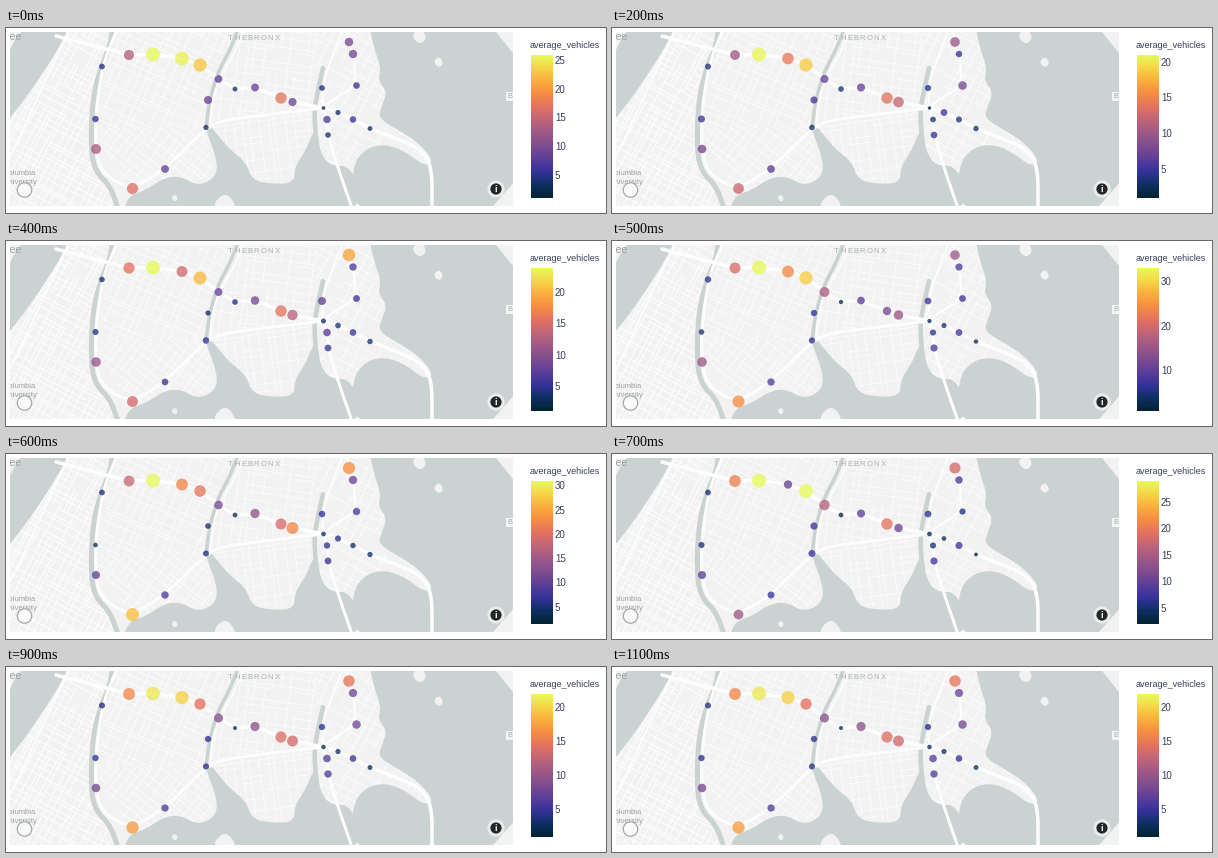
Animation, 600 px wide and 185 px high, one loop 1300 ms. Source, as a matplotlib script:

```python
import numpy as np
import matplotlib.pyplot as plt
from matplotlib.animation import FuncAnimation
from matplotlib.collections import LineCollection
from matplotlib.colors import LinearSegmentedColormap, Normalize
from matplotlib.patches import Circle, Polygon, Rectangle

W, H, DPI = 600, 185, 100
PX = 72 / DPI
LAND, WATER, STREET = "#f1f2f1", "#cad2d2", "#fdfdfd"
INK = "#364059"
BAR_TOP, BAR_BOTTOM = 27, 170
MAX_DOT = 14
FRAMES, STEP = 13, 100

thermal = LinearSegmentedColormap.from_list("thermal", [
    "#032333", "#0d3064", "#35329b", "#5d3e99", "#7e4d8f", "#9e5987",
    "#c16479", "#e17161", "#f68b45", "#fbad3c", "#f6d346", "#e7fa5a"])

# Colour range by hour; after LAST_HOUR the picture holds
HOURS = [0, 2, 4, 5, 7, 9]
LOW = [1, 1, 1, 1, 2, 1]
HIGH = [26, 21, 24, 33, 29, 22]
LAST_HOUR = HOURS[-1]

# Counters along each road: x, y, usual load
cross = [(123, 27, 15), (147, 26.5, 27), (176, 30.5, 17), (194, 37, 19),
         (212.5, 51, 11), (229, 61, 3), (249, 59.5, 9), (275, 70, 16), (286.5, 74, 12)]
harlem = [(96, 38.5, 4), (89.5, 91, 5), (90, 121, 9)]
bruckner = [(126.5, 160.5, 15), (159, 141, 7), (200, 99.5, 5), (202, 72, 5)]
shore = [(343, 14, 14), (347, 26, 7), (350.5, 57.5, 6), (316, 60, 5)]
throgs = [(317.5, 80, 2), (332, 84.5, 4), (347, 91.5, 5), (364, 100.5, 3)]
ferry = [(321, 91.5, 5), (322, 107, 6)]

xs, ys, load = np.array(cross + harlem + bruckner + shore + throgs + ferry).T
swing = np.exp(np.random.default_rng(4).normal(0, .22, (LAST_HOUR + 1, len(load))))

fig = plt.figure(figsize=(W / DPI, H / DPI), dpi=DPI, facecolor="white")
ax = fig.add_axes([0, 0, 1, 1])
ax.axis("off")
frame = Rectangle((4, 4), 503, 174, fc=LAND, ec="none", zorder=0)
ax.add_patch(frame)


def on_map(artist):
    artist.set_clip_path(frame)
    return artist


def smooth(pts, closed=False, rounds=2):
    """Corner cutting."""
    p = np.array(pts, float)
    for _ in range(rounds):
        a, b = (p, np.roll(p, -1, 0)) if closed else (p[:-1], p[1:])
        q = np.stack([.75 * a + .25 * b, .25 * a + .75 * b], 1).reshape(-1, 2)
        p = q if closed else np.vstack([p[:1], q, p[-1:]])
    return p


def area(pts, color=WATER, z=2):
    on_map(ax.add_patch(Polygon(smooth(pts, True), fc=color, ec="none", zorder=z)))


def road(pts, width, color=STREET, z=4):
    on_map(ax.plot(*smooth(pts).T, color=color, lw=width * PX, zorder=z,
                   solid_capstyle="round")[0])


def grid(region, angle, gap, seed, width=.8):
    """Rotated street grid with some gaps, cut to a region."""
    rng = np.random.default_rng(seed)
    mid = np.mean(region, 0)
    t = np.radians(angle)
    u, v = np.array([np.cos(t), np.sin(t)]), np.array([-np.sin(t), np.cos(t)])
    lines = []
    for along, across in ((u, v), (v, u)):
        for k in np.arange(-150, 150, gap):
            shift = k + rng.uniform(-.3, .3) * gap
            for s in range(-150, 150, 25):
                if rng.random() < .8:
                    a = mid + across * shift + along * s
                    lines.append([a, a + along * 25])
    streets = LineCollection(lines, colors=STREET, linewidths=width * PX, zorder=1)
    ax.add_collection(streets)
    streets.set_clip_path(Polygon(region, transform=ax.transData))


# Streets
grid([(4, 60), (60, 4), (104, 4), (84, 100), (108, 178), (4, 178)], -62, 6, 1, 1.1)
grid([(104, 4), (222, 4), (200, 100), (92, 100)], -66, 8, 2)
grid([(86, 100), (200, 100), (208, 150), (124, 166)], -52, 7.5, 3)
grid([(222, 4), (310, 4), (310, 80), (200, 96)], 8, 8.5, 4)
grid([(204, 97), (310, 82), (290, 156), (240, 150)], -8, 8.5, 5)
grid([(310, 4), (365, 4), (420, 130), (312, 140)], 28, 10, 6)

# Water
area([(20, -8), (66, -8), (52, 22), (20, 70), (-4, 100), (-4, 36)])
area([(362, -8), (368, 20), (375, 40), (372, 52), (381, 64), (376, 78), (372, 90),
      (394, 103), (414, 116), (428, 134), (418, 138), (400, 124), (380, 116),
      (360, 120), (346, 138), (346, 190), (520, 190), (520, -8)])
area([(116, 190), (122, 168), (140, 162), (158, 150), (174, 148), (192, 158),
      (209, 150), (212, 134), (198, 97), (204, 97), (222, 120), (240, 134),
      (246, 152), (266, 156), (288, 155), (289, 138), (300, 122), (307, 104),
      (312, 104), (314, 124), (324, 138), (346, 138), (364, 190)])
road([(106, 4), (104, 18), (93, 44), (86, 76), (85, 124), (90, 144),
      (104, 158), (112, 180)], 5, WATER, 2)
road([(231, 4), (223, 24), (211, 46), (203, 76), (200, 100)], 3.6, WATER, 2)
road([(317, 40), (312, 62), (308, 84), (310, 110)], 4.5, WATER, 2)
for x, y, r in ((169, 170, 4), (220, 178, 15), (414, 8, 9), (433, 34, 6)):
    area([(x - r, y), (x, y - r), (x + .8 * r, y + .2 * r), (x, y + r)], LAND, 3)

# Highways, through the counters where there are any
hub = throgs[0][:2]
xy = lambda row: [p[:2] for p in row]
road([(50, 8), (96, 20)] + xy(cross) + [hub], 3.6)
road([(110, 4)] + xy(harlem) + [(94, 140), (106, 152)] + xy(bruckner[:2])
     + [(198, 102), (214, 93), (250, 88), hub], 3)
road(xy(throgs) + [(394, 112), (416, 122), (426, 140), (426, 180)], 3.6)
road([hub] + xy(ferry) + [(332, 140), (346, 180)], 3)
road([(341, 4)] + xy(shore[:3]) + [(326, 72), hub], 2.4)
road([hub, shore[3][:2], (324, 34), (336, 4)], 2)
road([(237, 4), (229, 24), (214, 50), (206, 72), (204, 100)], 1.8)
road([(62, 6), (34, 64), (14, 108), (4, 128)], 1.8)


def label(x, y, s, size, color, **kw):
    return ax.text(x, y, s, fontsize=size * PX, color=color, va="center",
                   family="Liberation Sans", **kw)


# Place names and controls
for start, word in ((224.5, "THE"), (243.5, "BRONX")):
    for i, ch in enumerate(word):
        label(start + 6.9 * i, 10.5, ch, 7.8, "#adb3b5", ha="center", zorder=5)
for x, y, s, size in ((15, 9, "Fort Lee", 10.5), (30, 145.5, "Columbia", 7.6),
                      (31, 154.5, "University", 7.6)):
    on_map(label(x, y, s, size, "#9da2a4", ha="right", zorder=5, clip_on=True))
on_map(ax.add_patch(Rectangle((500, 64), 8, 8.5, fc="#f4f5f5", ec="none", zorder=5)))
on_map(label(501, 68.5, "B", 7.5, "#a5abad", ha="left", zorder=6, clip_on=True))
ax.add_patch(Circle((18.5, 162), 7.2, fc="#fafafa", ec="#a5aaab", lw=.9, zorder=7))
ax.add_patch(Circle((490, 161), 8.6, fc="white", ec="none", alpha=.6, zorder=7))
ax.add_patch(Circle((490, 161), 5.6, fc="#252727", ec="none", zorder=7))
label(490, 161.2, "i", 9, "white", ha="center", weight="bold", zorder=8)

# Colour bar
ax.imshow(np.linspace(1, 0, 256)[:, None], cmap=thermal, aspect="auto",
          extent=(525, 547, BAR_BOTTOM, BAR_TOP), zorder=2)
ax.set_xlim(0, W)
ax.set_ylim(H, 0)
label(524, 17.5, "average_vehicles", 9, INK, ha="left")
ticks = [label(549, 0, "", 9.8, INK, ha="left") for _ in range(6)]
dots = on_map(ax.scatter(xs, ys, s=1, c=load, cmap=thermal, alpha=.78,
                         linewidths=0, zorder=6))


def update(i):
    hour = min(i, LAST_HOUR)
    low, high = (np.interp(hour, HOURS, r) for r in (LOW, HIGH))
    counts = np.clip(load / 25 * high * swing[hour], low, high)
    dots.set_sizes((MAX_DOT * PX) ** 2 * counts / high)
    dots.set_array(counts)
    dots.set_norm(Normalize(low, high))
    step = 10 if high > 32 else 5
    for k, tick in enumerate(ticks, 1):
        v = k * step
        tick.set_text(str(v) if v <= high else "")
        tick.set_y(BAR_BOTTOM - (v - low) / (high - low) * (BAR_BOTTOM - BAR_TOP) + .5)
    return [dots, *ticks]


anim = FuncAnimation(fig, update, frames=FRAMES, interval=STEP,
                     init_func=lambda: update(0), repeat=True, repeat_delay=0)
plt.show()
```
